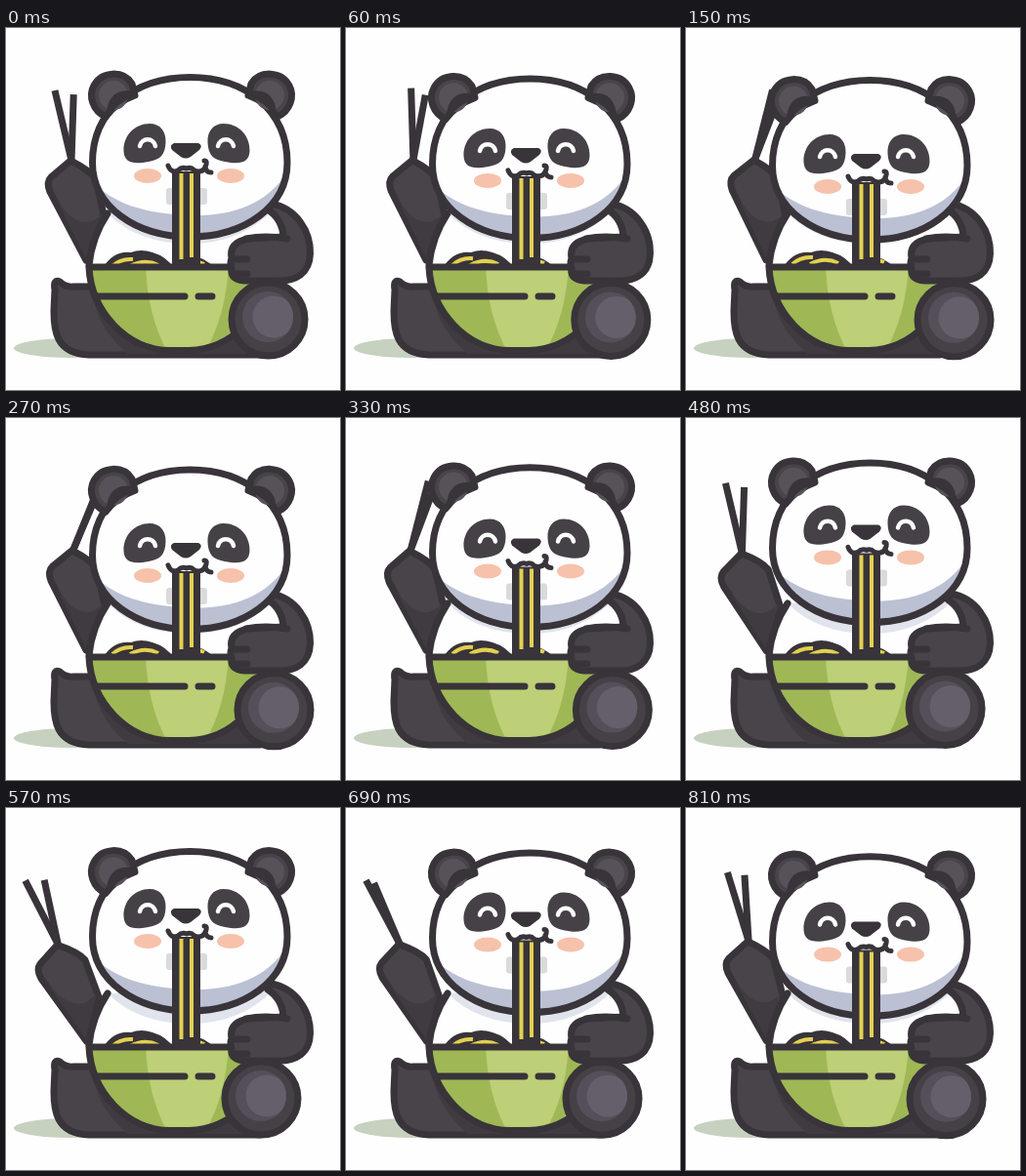
Animation, 342 px wide and 371 px high, one loop 0.84 s. Source, as an HTML page:

```html
<!DOCTYPE html>
<html lang="en">
<head>
<meta charset="utf-8">
<title>Panda eating noodles</title>
<style>
  html, body { margin: 0; width: 100%; height: 100%; overflow: hidden; background: #fefefe; }
  svg { display: block; width: 100vw; height: 100vh; }
  .ink { stroke: #38343a; stroke-width: 7; stroke-linejoin: round; stroke-linecap: round; }
  .fur { fill: #48444a; }
  .deep { fill: #3f3b41; }
  .dark { fill: #38343a; }
  .line { fill: none; }
  .stick { stroke: #38343a; stroke-width: 7; }
  .yellow { fill: none; stroke: #e3d04f; stroke-width: 4; }
</style>
</head>
<body>
<svg viewBox="0 0 342 371">
  <defs>
    <path id="skull" d="M88.5 138C88.5 84 132 50.5 188.5 50.5S288 84 288 138C288 183 244 214 188.5 214S88.5 183 88.5 138Z"/>
    <path id="bowlShape" d="M85 245C87 291 124 330 168 330.5H187C231 330 269 291 271 245Z"/>
    <clipPath id="skullClip"><use href="#skull"/></clipPath>
    <clipPath id="bowlClip"><use href="#bowlShape"/></clipPath>
    <clipPath id="padClip"><circle cx="268" cy="296" r="26"/></clipPath>
    <g id="earShape">
      <path class="ink fur" d="M102 91C89 85 84 70 90 59C98 44 120 43 129 57L132 69Q113 76 102 91Z"/>
      <circle cx="110" cy="69" r="15" fill="#57525a"/>
      <path class="dark" d="M104 92C101 74 112 61 130 65L133 70Q114 76 104 92Z"/>
    </g>
    <g id="eyeShape">
      <path fill="#454147" d="M120.5 126C120 110 132 98 147 98C158 98 164 106 163.5 117C163 130 158 135 146 137C130 140 121 138 120.5 126Z"/>
      <path d="M137 121C139 112 151 112 153 121" fill="none" stroke="#fff" stroke-width="4.5" stroke-linecap="round"/>
    </g>
  </defs>

  <ellipse cx="66" cy="328" rx="58" ry="10" fill="#c6d1bf"/>
  <path class="ink fur" d="M50 268Q48 257 55 260Q61 266 69 265H260V335H85Q62 334 54 319Q49 310 49 290Z"/>
  <path class="deep" d="M88 264Q90 305 125 334H260V264Z"/>

  <g id="arm">
    <path id="stickA" class="stick" d="M67 136V62"/>
    <path id="stickB" class="stick" d="M67 136V68"/>
    <path class="ink fur" d="M66 136L46 153Q41 158 45 168L82 238L101 196L92 155Q86 146 66 136Z"/>
    <path class="deep" d="M49 171Q75 215 99 190L82 236Z"/>
  </g>

  <path fill="#fefefe" d="M108 180Q86 210 86 245H245L285 215L272 175Z"/>
  <path fill="#e1e4ec" d="M104 190Q135 221 188 221T274 186Z"/>
  <path class="ink line" d="M104 190Q88 214 85 243"/>

  <path class="dark" d="M99 246Q110 228 128 230Q138 226 150 230Q164 234 172 246ZM168 246Q190 222 214 246Z"/>
  <g id="heapStrands" class="yellow">
    <path d="M109 242Q117 234 130 235M127 242Q142 234 156 241M178 240Q190 234 203 240"/>
  </g>

  <g clip-path="url(#bowlClip)">
    <path fill="#9fb855" d="M80 240H280V335H80Z"/>
    <path fill="#bdcf77" d="M143 240H228Q226 295 202 335H167Q144 295 143 240Z"/>
  </g>
  <use href="#bowlShape" class="ink line"/>
  <path class="ink line" d="M92 275H183M197 275H211"/>

  <path class="ink fur" d="M272 180C297 185 312 208 311.5 231C311 252 296 259 280 259H244Q229 258 231 246Q229 241 231 236Q228 220 248 216L284 214Q283 196 268 186Z"/>
  <path class="ink line" d="M246 216Q265 212 288 216M232 237H247M232 252H247"/>

  <g id="head">
    <use href="#skull" fill="#bbc0d3"/>
    <path clip-path="url(#skullClip)" fill="#fefefe" d="M80 40H300V120C284 175 240 192 195 192S102 182 80 146Z"/>
    <use href="#skull" class="ink line"/>
  </g>
  <g id="ears">
    <use href="#earShape"/>
    <use href="#earShape" transform="matrix(-1 0 0 1 380 0)"/>
  </g>
  <g id="face">
    <use href="#eyeShape"/>
    <use href="#eyeShape" transform="matrix(-1 0 0 1 370 0)"/>
    <ellipse cx="145" cy="151.5" rx="14" ry="7.5" fill="#f6c2ab"/>
    <ellipse cx="230" cy="151.5" rx="14" ry="7.5" fill="#f6c2ab"/>
    <rect x="164" y="164" width="42" height="17" rx="3" fill="#d9dadb"/>
    <path class="dark" d="M172 118H197Q202 120 198 125L189 132Q184 135 179 132L170 125Q167 120 172 118Z"/>
  </g>

  <path id="strandBack" stroke="#38343a" stroke-width="29"/>
  <path id="strands" class="yellow"/>
  <path id="mouth" class="ink line" style="stroke-width:5" d="M166 141Q169 149 176 146Q180 142 185 144Q189 142 193 146Q200 149 204 143Q207 136 203 136M204 142Q205 148 210 148"/>

  <g id="foot">
    <circle class="ink" cx="268.5" cy="298.5" r="37.5" fill="#454147"/>
    <circle cx="268" cy="296" r="26" fill="#544f59"/>
    <circle cx="274" cy="296" r="21.5" fill="#655f6b" clip-path="url(#padClip)"/>
  </g>
</svg>
<script>
const LOOP = 840;
const times = [0, 150, 270, 390, 570, 690, 810];
const tracks = {
  face:   [0, 11, 10, 0, -15, -11.5, -1.5],
  head:   [0, 3, 2.5, -2, -6, -4.5, -0.8],
  ears:   [0, 5.5, 5.3, -1.5, -3.5, -2, 0],
  foot:   [0, 6, 6, 2, -7, -6, -2],
  arm:    [0, 2, 1, -2.5, -8, -7, -1.7],
  stickA: [-13.5, 12, 21, 6, -19, -21, -15.5],
  stickB: [1.7, 19, 22, 18, -4, -16, -2],
  heap:   [2, 0, 0, 0, 2, 2, 2]
};
const el = id => document.getElementById(id);

// Smooth periodic curve through the key poses.
function sample(values, t) {
  const n = times.length;
  const wrap = i => (i + n) % n;
  const timeAt = i => times[wrap(i)] + LOOP * Math.floor(i / n);
  const valueAt = i => values[wrap(i)];
  const slope = i => (valueAt(i + 1) - valueAt(i - 1)) / (timeAt(i + 1) - timeAt(i - 1));
  let i = n - 1;
  while (times[i] > t) i--;
  const span = timeAt(i + 1) - times[i];
  const u = (t - times[i]) / span;
  const v = 1 - u;
  return valueAt(i) * v * v * (1 + 2 * u) + valueAt(i + 1) * u * u * (3 - 2 * u)
    + span * u * v * (slope(i) * v - slope(i + 1) * u);
}

const move = (id, x, y) => el(id).setAttribute('transform', `translate(${x} ${y})`);
const turn = (id, angle, x, y) => el(id).setAttribute('transform', `rotate(${angle} ${x} ${y})`);

function draw(now) {
  const t = now % LOOP;
  const pose = {};
  for (const key in tracks) pose[key] = sample(tracks[key], t);
  for (const id of ['face', 'head', 'ears']) move(id, 0, pose[id]);
  move('mouth', 0, pose.face);
  move('foot', pose.foot, pose.foot / 7);
  move('heapStrands', 0, pose.heap);
  turn('arm', pose.arm, 90, 235);
  turn('stickA', pose.stickA, 67, 136);
  turn('stickB', pose.stickB, 67, 136);
  const top = 147 + pose.face;
  el('strandBack').setAttribute('d', `M184.5 ${top}V243`);
  el('strands').setAttribute('d', `M179.5 ${top + 2}V237M190 ${top + 2}V235`);
}

function tick(now) {
  draw(now);
  requestAnimationFrame(tick);
}
draw(0);
requestAnimationFrame(tick);
</script>
</body>
</html>
```
